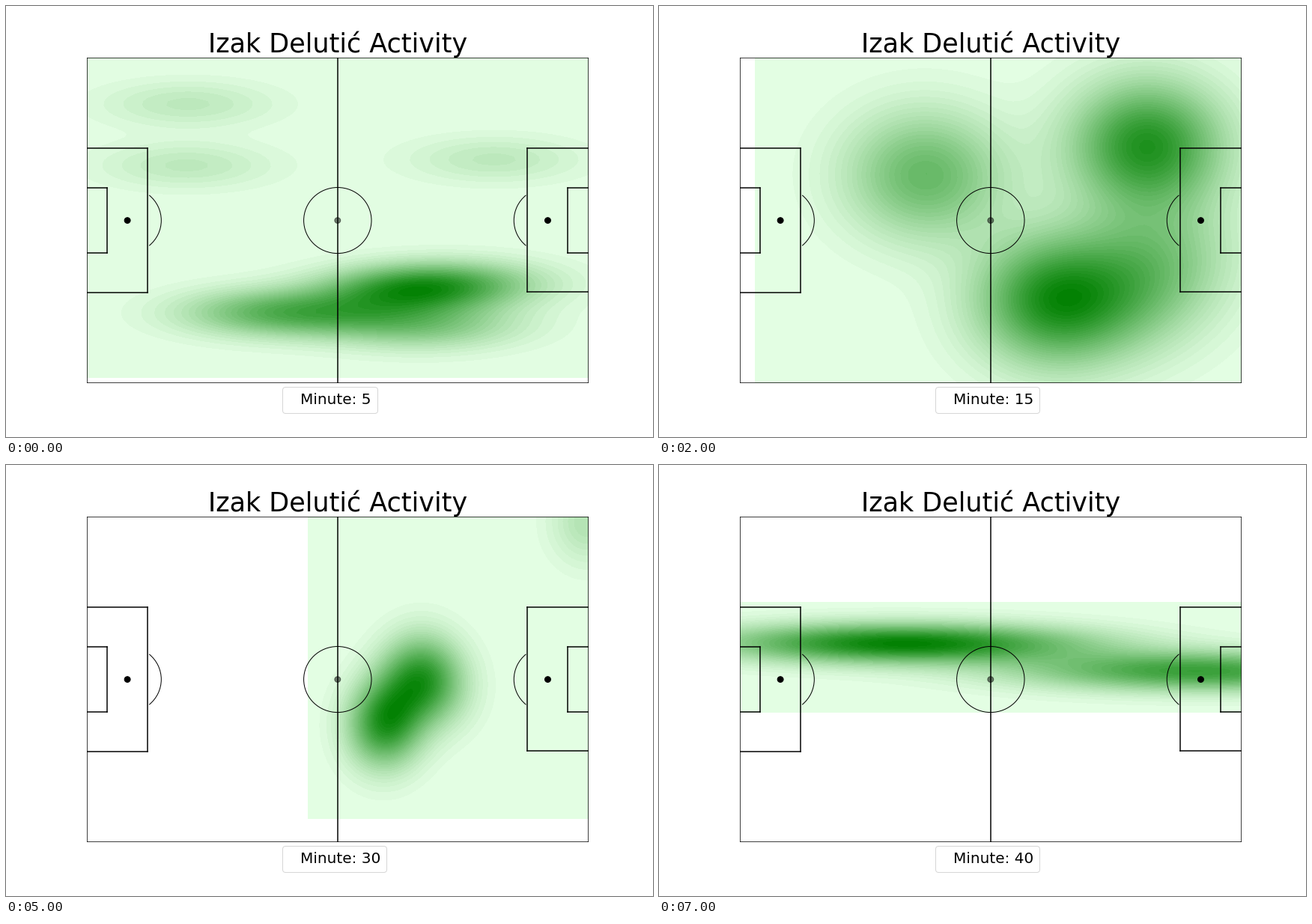
Write a matplotlib script that moves like this. It is 864 by 576 pixels and loops after 8000 ms.

```python
import numpy as np
import matplotlib.pyplot as plt
from matplotlib.animation import FuncAnimation
from matplotlib.colors import LinearSegmentedColormap
from matplotlib.lines import Line2D
from matplotlib.patches import Arc, Circle

LENGTH, WIDTH = 120, 80
LEFT, BOTTOM = 108, 504            # pitch corner on the stage, in pixels
SCALE_X, SCALE_Y = 669.6 / LENGTH, 434.88 / WIDTH

plt.rcParams["font.family"] = "DejaVu Sans"
greens = LinearSegmentedColormap.from_list("greens", [(0.9, 1, 0.9), (0, 128 / 255, 0)])

fig, ax = plt.subplots(figsize=(12, 8), dpi=72, facecolor="white")
fig.subplots_adjust(left=0.125, right=0.9, bottom=0.125, top=0.88)


def line(xs, ys):
    ax.plot(xs, ys, color="black", lw=1.5, zorder=2)


def draw_pitch():
    line([0, 0], [0, 80])
    line([0, 120], [80, 80])
    line([120, 120], [80, 0])
    line([120, 0], [0, 0])
    line([60, 60], [0, 80])
    # penalty areas and six-yard boxes
    for goal, box, low in ((0, 14.6, 22.2), (120, 105.4, 22.5)):
        line([box, box], [57.8, low])
        line([goal, box], [57.8, 57.8])
        line([goal, box], [low, low])
    for goal, box in ((0, 4.9), (120, 115.1)):
        line([goal, box], [48, 48])
        line([box, box], [48, 32])
        line([goal, box], [32, 32])
    ax.add_patch(Circle((60, 40), 8.1, color="black", fill=False, zorder=1.8))
    ax.add_patch(Circle((60, 40), 0.71, color="black", alpha=0.5, zorder=1.7))
    for spot, start, end in ((9.7, 310, 50), (110.3, 130, 230)):
        ax.add_patch(Circle((spot, 40), 0.71, color="black", zorder=1.8))
        ax.add_patch(Arc((spot, 40), 16.2, 16.2, theta1=start, theta2=end,
                         color="black", zorder=1.8))


def heat(bandwidth, bands, touches):
    """Filled Gaussian density of touches given in stage pixels."""
    x, y = np.array(touches, float).T
    bx, by = bandwidth
    gx = np.linspace(x.min() - 3 * bx, x.max() + 3 * bx, 100)
    gy = np.linspace(y.min() - 3 * by, y.max() + 3 * by, 100)
    kx = np.exp(-0.5 * ((gx[:, None] - x) / bx) ** 2)
    ky = np.exp(-0.5 * ((gy[:, None] - y) / by) ** 2)
    z = ky @ kx.T
    levels = np.linspace(0, z.max() * 1.01, bands + 1)
    layer = ax.contourf((gx - LEFT) / SCALE_X, (BOTTOM - gy) / SCALE_Y, z,
                        levels=levels, cmap=greens, zorder=1)
    layer.set_visible(False)
    layers.append(layer)


layers = []
heat((80, 21.2), 30, [
    (243, 131), (241, 213), (652, 205),
    (320, 412), (345, 405), (395, 415), (430, 408), (500, 416),
    (525, 378), (520, 385), (545, 380), (560, 370), (590, 375),
    (640, 368), (545, 433), (600, 425)])
heat((40, 24), 31, [
    (342, 306), (352, 309), (612, 321), (590, 350),
    (515, 402), (528, 383), (535, 378), (545, 380), (535, 385)])
heat((70, 58), 36, [
    (338, 224), (374, 228), (650, 185), (655, 180), (650, 193),
    (515, 390), (527, 400), (540, 390), (630, 385), (675, 330)])
heat((40.7, 18), 31, [
    (380, 229), (419, 318), (458, 368), (465, 405),
    (485, 420), (495, 422), (505, 418), (500, 412), (510, 432),
    (545, 405), (562, 391), (575, 392), (585, 390), (591, 386), (580, 396)])
heat((45, 25), 32, [
    (464, 395), (490, 380), (505, 400), (560, 340),
    (640, 310), (650, 300), (560, 420)])
heat((33, 38), 35, [
    (502, 350), (504, 359), (503, 340), (520, 325),
    (538, 292), (553, 272), (560, 285), (582, 298), (776, 76)])
heat((60, 28), 33, [
    (417, 300), (440, 310), (520, 390), (540, 400), (600, 360), (640, 290)])
heat((150, 17.8), 36, [
    (250, 236.5), (310, 240), (340, 238), (420, 240),
    (650, 273), (720, 277), (790, 277)])

draw_pitch()
ax.set_xlim(0, LENGTH)
ax.set_ylim(0, WIDTH)
ax.axis("off")
ax.set_title("Izak Delutić Activity", fontsize=35)

legend = ax.legend([Line2D([], [], ls="none")], ["Minute: 5"], fontsize=20,
                   handlelength=0, loc="lower left", bbox_to_anchor=(0.375, -0.115))
label = legend.get_texts()[0]


def update(i):
    for k, layer in enumerate(layers):
        layer.set_visible(k == i)
    label.set_text(f"Minute: {5 * (i + 1)}")
    return layers + [legend]


anim = FuncAnimation(fig, update, frames=len(layers), interval=1000,
                     repeat=True, repeat_delay=0, blit=False)
plt.show()
```
